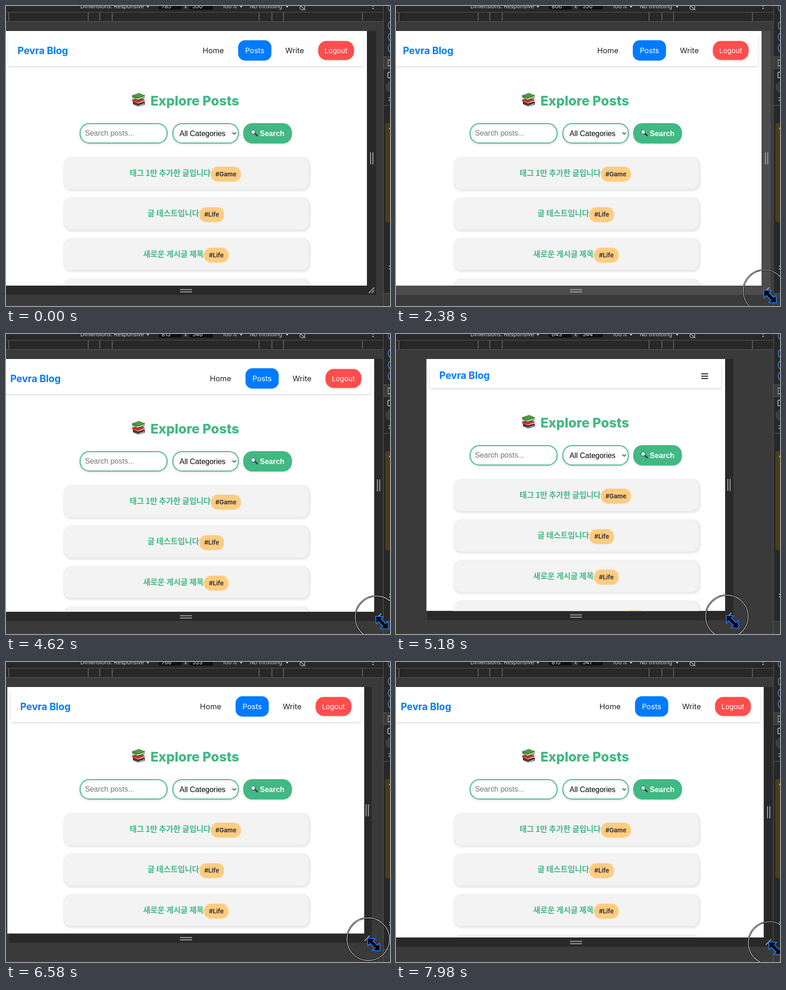
Animation, 832 px wide and 648 px high, one loop 8000 ms. Source, as an HTML page with a canvas:

```html
<!DOCTYPE html>
<html lang="ko">
<head>
<meta charset="utf-8">
<style>
  html, body { margin: 0; width: 100%; height: 100%; overflow: hidden; background: #3a3a3a; }
  canvas { display: block; }
</style>
</head>
<body>
<canvas id="stage" width="832" height="648"></canvas>
<script>
const ctx = document.getElementById('stage').getContext('2d');
const LOOP = 8000, STEP = 70;
const CENTER = 389.5, TOP = 54;
const GREEN = '#42b883', BLUE = '#007bff', CARD = '#f3f3f3', GRIP = '#a3a3a3';
const INTER = 'Inter, sans-serif', ARIAL = '"Liberation Sans", Arial, sans-serif';
const KOREAN = '"Noto Sans CJK KR", "Noto Sans CJK", sans-serif';

// [time, viewport width, viewport height]
const SIZES = [
  [0, 785, 550], [1890, 785, 550], [2520, 809, 550], [2590, 809, 550],
  [3500, 623, 552], [3710, 623, 552], [4340, 819, 547], [4550, 819, 546],
  [5320, 626, 544], [5530, 626, 544], [6160, 816, 528], [6370, 816, 528],
  [7000, 622, 546], [7140, 622, 546], [7980, 815, 541]
];
// [time, x, y] of the pointer before the drag begins
const APPROACH = [[210, 655, 648], [700, 808, 622], [980, 805, 619], [1260, 786, 615]];

const POSTS = [
  ['태그 1만 추가한 글입니다', '#Game', 444, 65],
  ['글 테스트입니다', '#Life', 419, 53.5],
  ['새로운 게시글 제목', '#Life', 429, 53.5],
  ['지금은 뷰에서 글을 테스트하고있어요', '#Life', 493, 53.5]
];

function sample(keys, t) {
  const i = keys.findIndex(k => k[0] > t);
  if (i < 0) return keys[keys.length - 1].slice(1);
  if (i === 0) return keys[0].slice(1);
  const a = keys[i - 1], b = keys[i], p = (t - a[0]) / (b[0] - a[0]);
  const e = p * p * (3 - 2 * p);
  return [a[1] + (b[1] - a[1]) * e, a[2] + (b[2] - a[2]) * e];
}

function rect(x, y, w, h, color) {
  ctx.fillStyle = color;
  ctx.fillRect(x, y, w, h);
}

function round(x, y, w, h, r, fill, stroke, lineWidth = 2) {
  ctx.beginPath();
  ctx.roundRect(x, y, w, h, r);
  if (fill) { ctx.fillStyle = fill; ctx.fill(); }
  if (stroke) { ctx.strokeStyle = stroke; ctx.lineWidth = lineWidth; ctx.stroke(); }
}

function withShadow(alpha, blur, dx, dy, draw) {
  ctx.save();
  ctx.shadowColor = `rgba(0,0,0,${alpha})`;
  ctx.shadowBlur = blur;
  ctx.shadowOffsetX = dx;
  ctx.shadowOffsetY = dy;
  draw();
  ctx.restore();
}

function text(str, x, y, font, color, align = 'left') {
  ctx.font = font;
  ctx.fillStyle = color;
  ctx.textAlign = align;
  ctx.fillText(str, x, y);
}

function line(points, color, width) {
  ctx.beginPath();
  points.forEach(([x, y]) => ctx.lineTo(x, y));
  ctx.strokeStyle = color;
  ctx.lineWidth = width;
  ctx.stroke();
}

function poly(points, fill, stroke, width) {
  ctx.beginPath();
  points.forEach(([x, y]) => ctx.lineTo(x, y));
  ctx.closePath();
  if (stroke) { ctx.strokeStyle = stroke; ctx.lineWidth = width; ctx.stroke(); }
  ctx.fillStyle = fill;
  ctx.fill();
}

function circle(x, y, r, color, width, fill) {
  ctx.beginPath();
  ctx.arc(x, y, r, 0, Math.PI * 2);
  if (fill) { ctx.fillStyle = fill; ctx.fill(); }
  ctx.strokeStyle = color;
  ctx.lineWidth = width;
  ctx.stroke();
}

function drawToolbar(width, height) {
  rect(0, 0, 832, 648, '#3a3a3a');
  rect(0, 0, 817, 34, '#282828');
  rect(0, 13, 817, 1, '#5b5b5b');
  rect(0, 33, 817, 1, '#5b5b5b');
  [6, 178, 203, 230, 548, 576, 601, 772].forEach(x => rect(x - 0.5, 14, 1.5, 18, '#707070'));

  const font = '12px ' + INTER, color = '#c9c9c9';
  text('Dimensions: Responsive', 161, 4.5, font, color);
  text('100%', 469, 4.5, font, color);
  text('No throttling', 528, 4.5, font, color);
  [307.5, 509.5, 609].forEach(x => poly([[x - 4, -2], [x + 4, -2], [x, 4]], color));
  [[331, width], [398, height]].forEach(([x, value]) => {
    round(x, -12, 50, 20, 4, '#101010');
    text(Math.round(value), x + 6, 4.5, font, '#e4e4e4');
  });
  text('x', 386, 5, font, color);
  circle(642, 3, 5.5, color, 1.3);
  line([[635, -3], [649, 9]], color, 1.3);
  rect(794, 0, 2.5, 1.5, color);
  rect(794, 4, 2.5, 2.5, color);
}

function drawSidePanel() {
  rect(817, 0, 15, 648, '#282828');
  rect(817, 0, 1, 648, '#5b5b5b');
  [3, 42, 67, 91].forEach(y => circle(839, y, 11, '#3f8fdc', 1.5));
  rect(818, 109, 14, 26, '#3c3c3c');
  [109, 135, 214, 620].forEach(y => rect(818, y, 14, 1, '#5b5b5b'));
  for (let i = 0; i < 4; i++) {
    rect(827, 116 + i * 4, 2, 2, '#c9c9c9');
    rect(830, i < 2 ? 116 : 128, 2, 2, '#c9c9c9');
  }
  round(827.5, 143, 9, 12, 1, null, '#d0d0d0', 1.5);
  circle(835, 175, 11.5, '#555', 1, '#3c3c3c');
  text('3', 828, 205, '11px ' + INTER, '#d0d0d0');
  round(822, 253, 20, 214, 4, '#4a3d18');
  rect(830, 263, 2, 3, '#d9a52a');
  rect(830, 561, 2, 2, '#bbb');
  rect(830, 567, 2, 2, '#bbb');
  rect(818, 621, 14, 27, '#3a3a3a');
  rect(0, 647, 832, 1, '#4a3c40');
}

function drawResizers(width, height, hovered) {
  const left = CENTER - width / 2, right = CENTER + width / 2, bottom = TOP + height;
  const color = hovered ? '#4c4c4c' : '#292929';
  rect(left, TOP, width + 20, height + 20, color);
  const middle = (TOP + bottom) / 2;
  [7, 12].forEach(d => {
    rect(right + d, middle - 13, 2, 26, GRIP);
    rect(377, bottom + d + 0.5, 26, 2, GRIP);
  });
  line([[right + 4, bottom + 16], [right + 16, bottom + 4]], GRIP, 2);
  line([[right + 10, bottom + 16], [right + 16, bottom + 10]], GRIP, 2);
}

function drawNav(left, right, mobile) {
  const width = right - left - 16;
  withShadow(0.16, 4, 0, 2, () => round(left + 8, 62, width, mobile ? 55 : 67.5, 3, '#fff'));
  rect(left + 4, TOP, width + 8, 12, '#fff');
  text('Pevra Blog', left + 28, mobile ? 97 : 103.5, '700 21px ' + INTER, BLUE);
  if (mobile) {
    [85, 90, 95].forEach(y => rect(right - 52, y, 15, 2.2, '#2b2b2b'));
    return;
  }
  const font = '16.5px ' + INTER;
  text('Home', right - 333, 102, font, '#222', 'center');
  round(right - 279, 74, 72, 44, 15, BLUE);
  text('Posts', right - 243, 102, '16px ' + INTER, '#fff', 'center');
  text('Write', right - 156.5, 102, font, '#222', 'center');
  withShadow(0.14, 4, 0, 2, () => round(right - 105.5, 75.5, 77.5, 41, 18, '#ff4d4d'));
  text('Logout', right - 67, 101.5, '15px ' + INTER, '#fff', 'center');
}

function drawBooks() {
  poly([[275, 207], [291, 202], [301, 208], [301, 213], [286, 217], [275, 212]], '#34343a');
  poly([[276, 211], [286, 215], [300, 210], [300, 212], [286, 216]], '#dedbd2');
  poly([[273, 202], [290, 198], [300, 202], [300, 207], [286, 211], [274, 207]], '#b9362e');
  poly([[275, 205], [286, 209], [299, 204], [299, 206], [286, 210]], '#eee5d8');
  poly([[273, 193], [288, 188], [301, 193], [300, 199], [285, 203], [274, 198]], '#347c39');
  poly([[275, 196], [285, 200], [300, 195], [300, 197], [285, 202]], '#e9e7d7');
  poly([[274, 193], [288, 188], [301, 193], [286, 198]], '#4c9b47');
}

function drawSearch() {
  const fields = [[160.5, 188.5], [361.5, 142]];
  fields.forEach(([x, w]) => {
    withShadow(0.12, 4, 0, 2, () => round(x, 254, w, 42, 20, '#fff', GREEN));
  });
  text('Search posts...', 171, 280, '16px ' + ARIAL, '#757575');
  text('All Categories', 376, 280.5, '16px ' + ARIAL, '#000');
  line([[490.5, 273], [494.5, 277], [498.5, 273]], '#222', 1.4);
  withShadow(0.12, 4, 0, 2, () => round(514, 253, 105.5, 44, 20, GREEN));
  line([[539, 275], [545, 281]], '#2e3438', 3);
  circle(535.5, 272, 4.7, '#59656b', 1.5, '#c9e8f3');
  text('Search', 550, 280.5, 'bold 16px ' + ARIAL, '#fff');
}

function drawPosts(pageWidth) {
  const width = Math.min(532, pageWidth - 105), left = CENTER + 0.5 - width / 2;
  POSTS.forEach(([title, tag, tagX, tagWidth], i) => {
    const y = 326 + i * 87.5;
    round(left, y, width + 5, 75, 18, CARD);
    withShadow(0.09, 4, 1, 1, () => round(left + 1, y + 1, width - 1, 68.5, 17, CARD));
    text(title, tagX - 0.5, y + 40.5, '700 16.8px ' + KOREAN, GREEN, 'right');
    round(tagX, y + 21, tagWidth, 32.5, 15, '#ffcc80');
    text(tag, tagX + tagWidth / 2, y + 41.5, '700 13px ' + INTER, '#333', 'center');
  });
}

function drawPage(width, height) {
  const left = CENTER - width / 2, right = CENTER + width / 2, mobile = width <= 768;
  ctx.save();
  ctx.beginPath();
  ctx.rect(left, TOP, width, height);
  ctx.clip();
  rect(left, TOP, width, height, '#fff');
  drawNav(left, right, mobile);
  if (mobile) ctx.translate(0, -13);
  drawBooks();
  text('Explore Posts', 409, 215, '800 28.5px ' + INTER, GREEN, 'center');
  drawSearch();
  drawPosts(width);
  ctx.restore();
}

function drawPointer(x, y, resizing) {
  ctx.save();
  ctx.lineJoin = 'miter';
  if (resizing) {
    ctx.translate(x + 12, y + 11.5);
    ctx.rotate(Math.PI / 4);
    const half = [[-18, 0], [-8, -9], [-8, -3.2], [8, -3.2], [8, -9], [18, 0]];
    const mirrored = half.slice(1, -1).reverse().map(([u, v]) => [u, -v]);
    poly([...half, ...mirrored], '#000', '#1c7dff', 3.6);
  } else {
    ctx.translate(x, y);
    poly([[0, 0], [0, 23], [5.5, 18], [9.5, 27], [13.5, 25], [9.5, 16.5], [17, 16.5]],
      '#000', '#1c7dff', 3.6);
  }
  ctx.restore();
}

function render(time) {
  const t = Math.floor((time % LOOP) / STEP) * STEP;
  const [width, height] = sample(SIZES, t);
  // The page reflows slightly after its frame is resized.
  const [pageWidth] = sample(SIZES, Math.max(0, t - 20));

  drawToolbar(width, height);
  drawResizers(width, height, t >= 1960 && t < 2660);
  drawPage(pageWidth, height);
  drawSidePanel();

  if (t < 280) return;
  let [x, y] = sample(APPROACH, t);
  if (t >= 1890) {
    const offset = t < 5400 ? 6 : t < 6300 ? 9.5 : 12.5;
    const grab = Math.min(1, (t - 1820) / 420);
    x = CENTER + width / 2 + 4 + (offset - 4) * grab;
    y = TOP + height + 11 + grab;
  }
  if (t >= 1400) {
    ctx.globalAlpha = Math.min(1, (t - 1330) / 210);
    circle(x, y, 46, '#000', 3.2);
    circle(x, y, 46, '#fff', 1.2);
    ctx.globalAlpha = 1;
  }
  drawPointer(x, y, t >= 1120);
}

const start = performance.now();
function tick() {
  render(performance.now() - start);
  requestAnimationFrame(tick);
}
tick();
</script>
</body>
</html>
```
